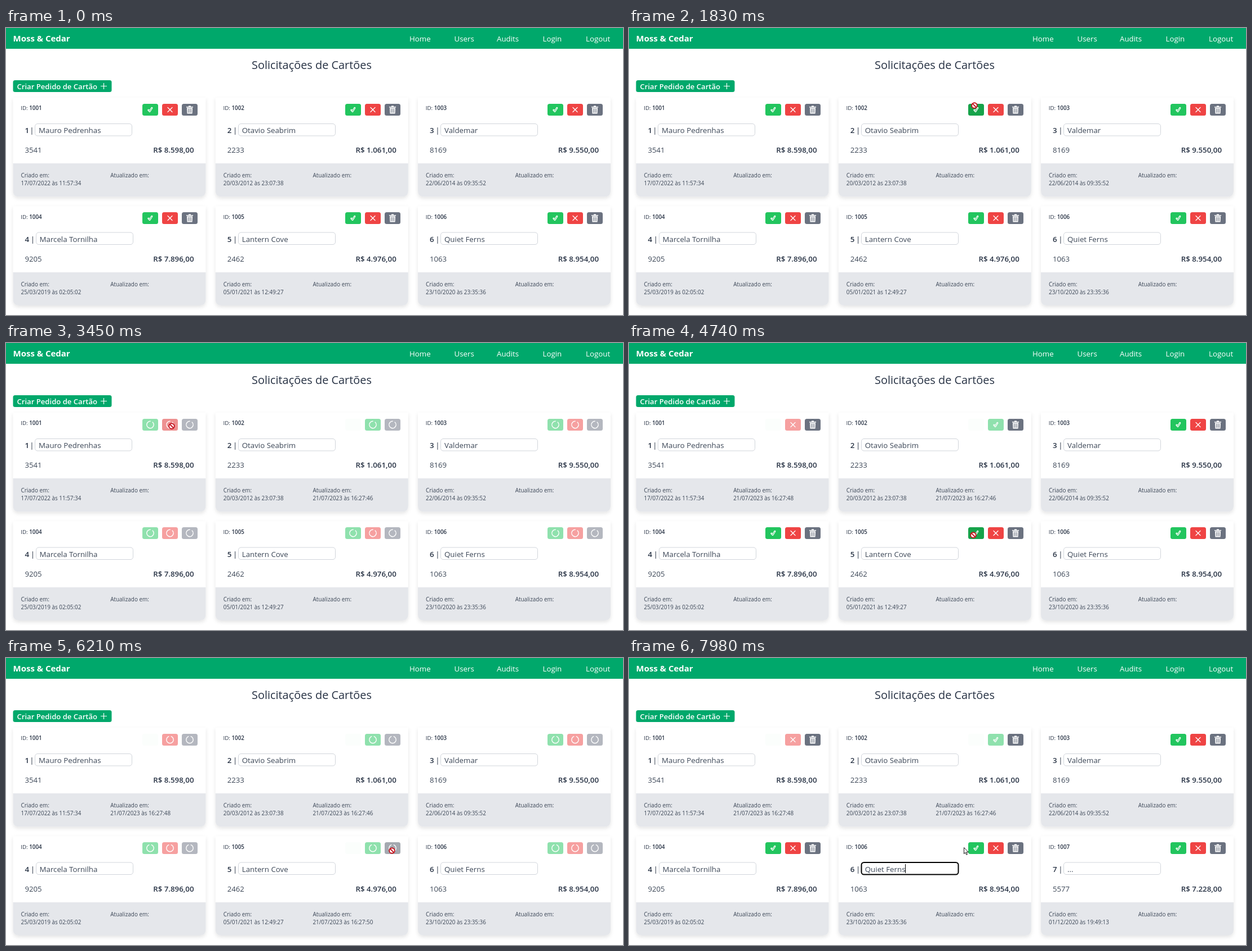
These frames come from a looping animation (1095 by 511 pixels, 8000 ms). An HTML page:

```html
<!DOCTYPE html>
<html lang="pt-BR">
<head>
<meta charset="utf-8">
<title>Solicitações de Cartões</title>
<style>
  html, body { margin: 0; width: 100%; height: 100%; overflow: hidden; background: #fff; }
  svg { display: block; width: 1095px; height: 511px; font-family: "Open Sans", "Noto Sans", sans-serif; cursor: default; }
  text { white-space: pre; }
  .card { filter: drop-shadow(0 3px 3px rgba(0, 0, 0, .1)); }
</style>
</head>
<body>
<svg viewBox="0 0 1095 511">
  <g id="page"></g>
  <g id="cards"></g>
  <g id="pointer"></g>
</svg>
<script>
const LOOP = 8000, STEP = 30;
const INK = '#273244', SOFT = '#3c4757', JADE = '#00a86b';
const GREEN = ['#22c55e', '#16a34a'], RED = ['#ef4444', '#dc2626'], GRAY = ['#6b7280', '#4b5563'];
const $ = id => document.getElementById(id);

const items = [
  ['Mauro Pedrenhas', '3541', '8.598,00', '17/07/2022 às 11:57:34'],
  ['Otavio Seabrim', '2233', '1.061,00', '20/03/2012 às 23:07:38'],
  ['Valdemar', '8169', '9.550,00', '22/06/2014 às 09:35:52'],
  ['Marcela Tornilha', '9205', '7.896,00', '25/03/2019 às 02:05:02'],
  ['Lantern Cove', '2462', '4.976,00', '05/01/2021 às 12:49:27'],
  ['Quiet Ferns', '1063', '8.954,00', '23/10/2020 às 23:35:36'],
  ['...', '5577', '7.228,00', '01/12/2020 às 19:49:13']
].map(([name, code, price, made], i) => ({ n: i + 1, name, code, price, made }));

// each click blocks the pointer, shows spinners, then stamps its card
const clicks = [
  { at: 1830, end: 1980, n: 2, verdict: 'ok' },
  { at: 3360, end: 3480, n: 1, verdict: 'no' },
  { at: 4740, end: 4830, n: 5, verdict: 'ok' },
  { at: 6180, end: 6510, n: 5, verdict: 'ok' }
].map((c, i) => ({ ...c, stamp: '21/07/2023 às 16:27:' + (46 + 2 * i) }));
const REMOVED = 6870, FOCUS = 7560;

// pointer moves: start, end, bend x y, goal x y
const HOME = [1081, 32];
const moves = [
  [570, 1170, 640, 36, 521, 120],
  [1170, 1590, 525, 146, 613, 138],
  [2520, 3210, 430, 196, 294, 148],
  [3810, 4590, 475, 305, 611, 342],
  [5250, 5910, 660, 362, 685, 343],
  [6840, 7560, 595, 366.6, 529, 373],
  [7710, 7980, 570, 365, 594, 337]
];
const easeOut = k => 1 - (1 - k) ** 3;

function pointAt(t) {
  if (t < 600 || (t >= 1980 && t < 2190)) return null;
  let [x, y] = HOME;
  for (const [from, to, bx, by, gx, gy] of moves) {
    if (t < from) break;
    const k = easeOut(Math.min(1, (t - from) / (to - from))), r = 1 - k;
    const bend = (a, b, c) => r * r * a + 2 * r * k * b + k * k * c;
    [x, y] = [bend(x, bx, gx), bend(y, by, gy)];
  }
  return { x, y };
}

const pointers = {
  arrow: '<path d="M.5 .5V11.6L3 9.3 4.7 13.3 6.5 12.5 4.8 8.6H8.3Z" fill="#fff" stroke="#000" stroke-width=".9"/>',
  hand: '<path d="M-1.5 9V1.8a1.5 1.5 0 0 1 3 0V6l5 1q1.6.4 1.5 2.2L7 13v3.5H-.5L-5 11q-.6-2 1.4-1.8Z" fill="#fff" stroke="#000" stroke-width=".9"/>',
  block: '<circle r="4.8" fill="#fff" stroke="#c4101c" stroke-width="1.9"/><path d="M-3.4-3.4 3.4 3.4" stroke="#c4101c" stroke-width="1.9"/>',
  beam: '<path d="M-3-7.5H-1L0-7 1-7.5H3M0-7V7M-3 7.5H-1L0 7 1 7.5H3" fill="none" stroke="#000"/>'
};

const icons = {
  check: bg => `<path d="M-3.1 .7-1 2.9 2.8-3.1" fill="none" stroke="#fff" stroke-width="3.1" stroke-linejoin="round" stroke-linecap="round"/>
    <path d="M-3 .8-1 2.8 2.7-3" fill="none" stroke="${bg}" stroke-width=".9"/>`,
  cross: () => '<path d="M-4-4 4 4M4-4-4 4" stroke="#fff" stroke-width="1.3" stroke-linecap="round"/>',
  trash: bg => `<path d="M-6-5.6H-2V-7H2V-5.6H6V-4H-6ZM-5-3.2H5L4.5 7H-4.5Z" fill="#fff"/>
    <path d="M-2.4-1.8V5.4M0-1.8V5.4M2.4-1.8V5.4" stroke="${bg}"/>`,
  spin: turn => `<path d="M2.2-5.8A6.2 6.2 0 1 1-2.2-5.8" transform="rotate(${turn})" fill="none" stroke="#fff" stroke-width="1.4" stroke-linecap="round"/>`
};

const inside = (p, x, y, w, h) => p && p.x >= x && p.x < x + w && p.y >= y && p.y < y + h;

const rect = (x, y, w, h, r, fill, more = '') =>
  `<rect x="${x}" y="${y}" width="${w}" height="${h}" rx="${r}" fill="${fill}" ${more}/>`;

function text(x, y, size, str, { fill = INK, weight = 400, anchor = 'start' } = {}) {
  return `<text x="${x}" y="${Math.round(y)}" font-size="${size}" font-weight="${weight}" fill="${fill}" text-anchor="${anchor}">${str}</text>`;
}

const pen = document.createElement('canvas').getContext('2d');
function nameWidth(str) {
  pen.font = '13.3px "Open Sans", "Noto Sans", sans-serif';
  return pen.measureText(str).width;
}

function drawPage() {
  const links = [['Home', 716], ['Users', 795.5], ['Audits', 871], ['Login', 952.5], ['Logout', 1029]];
  $('page').innerHTML =
    rect(0, 0, 1095, 37, 0, JADE) +
    text(12.5, 24, 15, 'Moss &amp; Cedar', { fill: '#fff', weight: 700 }) +
    links.map(([s, x]) => text(x, 24, 13.3, s, { fill: '#fff' })).join('') +
    text(542.5, 73, 19.9, 'Solicitações de Cartões', { anchor: 'middle' }) +
    rect(12.5, 93, 175, 21, 3.5, JADE) +
    text(19.5, 109, 13.1, 'Criar Pedido de Cartão', { fill: '#fff', weight: 600 }) +
    '<path d="M168 103.5H179M173.5 98V109" stroke="#fff" stroke-width="1.2"/>';
}

function buttonsOf(verdict) {
  const ok = verdict === 'ok', done = !!verdict;
  return [
    { icon: 'check', hues: GREEN, hidden: done },
    { icon: ok ? 'check' : 'cross', hues: ok ? GREEN : RED, off: done },
    { icon: 'trash', hues: GRAY }
  ];
}

function sceneAt(t) {
  const p = pointAt(t), click = clicks.find(c => t >= c.at && t < c.end);
  const spin = click && t > click.at ? (t - click.at - STEP) * .36 : null;
  const shown = items.filter(it => t < REMOVED || it.n !== 5).slice(0, 6);
  let pointer = 'arrow', hot = '';
  const cards = shown.map((item, i) => {
    const x = 12.5 + 359.25 * (i % 3), y = i < 3 ? 0 : 193.5;
    const { verdict, stamp } = clicks.filter(c => c.n === item.n && c.end <= t).pop() || {};
    const field = x + (item.n === 1 ? 38.5 : 40);
    const buttons = buttonsOf(verdict).map((b, j) => {
      const bx = Math.round(x + 229.8 + 35 * j), by = Math.round(y + 134.8);
      const hover = !b.hidden && inside(p, bx, by, 28, 21);
      if (hover) {
        pointer = b.off ? 'block' : 'hand';
        hot = item.n + '-' + j;
      }
      return { ...b, x: bx, y: by, hover };
    });
    if (inside(p, field, y + 170, 173, 22)) pointer = 'beam';
    return { item, x, y, stamp, field, buttons, focus: item.n === 6 && t >= FOCUS };
  });
  if (click) pointer = 'block';
  const past = clicks.filter(c => c.end <= t).length;
  return { cards, p, pointer, spin, key: [hot, spin, past, t >= REMOVED, t >= FOCUS].join() };
}

function drawButton(b, spin) {
  const bg = b.hues[b.hover ? 1 : 0], busy = spin !== null;
  const icon = b.hidden ? '' : busy ? icons.spin(spin) : icons[b.icon](bg);
  const alpha = b.hidden ? .02 : b.off || busy ? .5 : 1;
  return `<g opacity="${alpha}">${rect(b.x, b.y, 28, 21, 3.5, bg)}
    <g transform="translate(${b.x + 14} ${b.y + 10.5})">${icon}</g></g>`;
}

function drawCard({ item, x, y, stamp, field, buttons, focus }, spin) {
  const fx = Math.round(field) + .5, soft = { fill: SOFT }, bottom = y + 300.5;
  const panel = (top, fill, more = '') =>
    `<path d="M${x} ${top}h342V${bottom - 11}q0 11-11 11H${x + 11}q-11 0-11-11Z" fill="${fill}" ${more}/>`;
  return panel(y + 124, '#fff', 'class="card"') +
    panel(Math.round(y + 241), '#e5e7eb') +
    text(x + 13.7, y + 146, 9.8, `ID: <tspan font-weight="600">${1000 + item.n}</tspan>`) +
    buttons.map(b => drawButton(b, spin)).join('') +
    text(x + 21, y + 187, 13.3, item.n, { weight: 600 }) +
    text(field - 5, y + 187, 13.3, '|', { anchor: 'middle' }) +
    rect(fx, y + 170.5, 172, 21.5, 4.5, '#fff', focus ? 'stroke="#000" stroke-width="2"' : 'stroke="#d1d5db"') +
    text(field + 7, y + 187, 13.3, item.name, soft) +
    (focus ? rect(Math.round(field + 7 + nameWidth(item.name)), y + 173.5, 1, 16, 0, '#000') : '') +
    text(x + 21, y + 222, 13.2, item.code, soft) +
    text(x + 321, y + 222, 13.3, 'R$ ' + item.price, { weight: 600, anchor: 'end' }) +
    text(x + 14, y + 266, 9.95, 'Criado em:', soft) +
    text(x + 14, y + 280, 9.9, item.made, soft) +
    text(x + 172.7, y + 266, 9.95, 'Atualizado em:', soft) +
    (stamp ? text(x + 172.7, y + 280, 9.9, stamp, soft) : '');
}

let lastKey = '', lastPointer = '';
function render(now) {
  const { cards, p, pointer, spin, key } = sceneAt(Math.floor((now % LOOP) / STEP) * STEP);
  if (key !== lastKey) {
    $('cards').innerHTML = cards.map(c => drawCard(c, spin)).join('');
    lastKey = key;
  }
  const kind = p ? pointer : '';
  if (kind !== lastPointer) {
    $('pointer').innerHTML = pointers[kind] || '';
    lastPointer = kind;
  }
  if (p) $('pointer').setAttribute('transform', `translate(${p.x} ${p.y})`);
}

drawPage();
const start = performance.now();
function tick() {
  render(performance.now() - start);
  requestAnimationFrame(tick);
}
tick();
</script>
</body>
</html>
```
